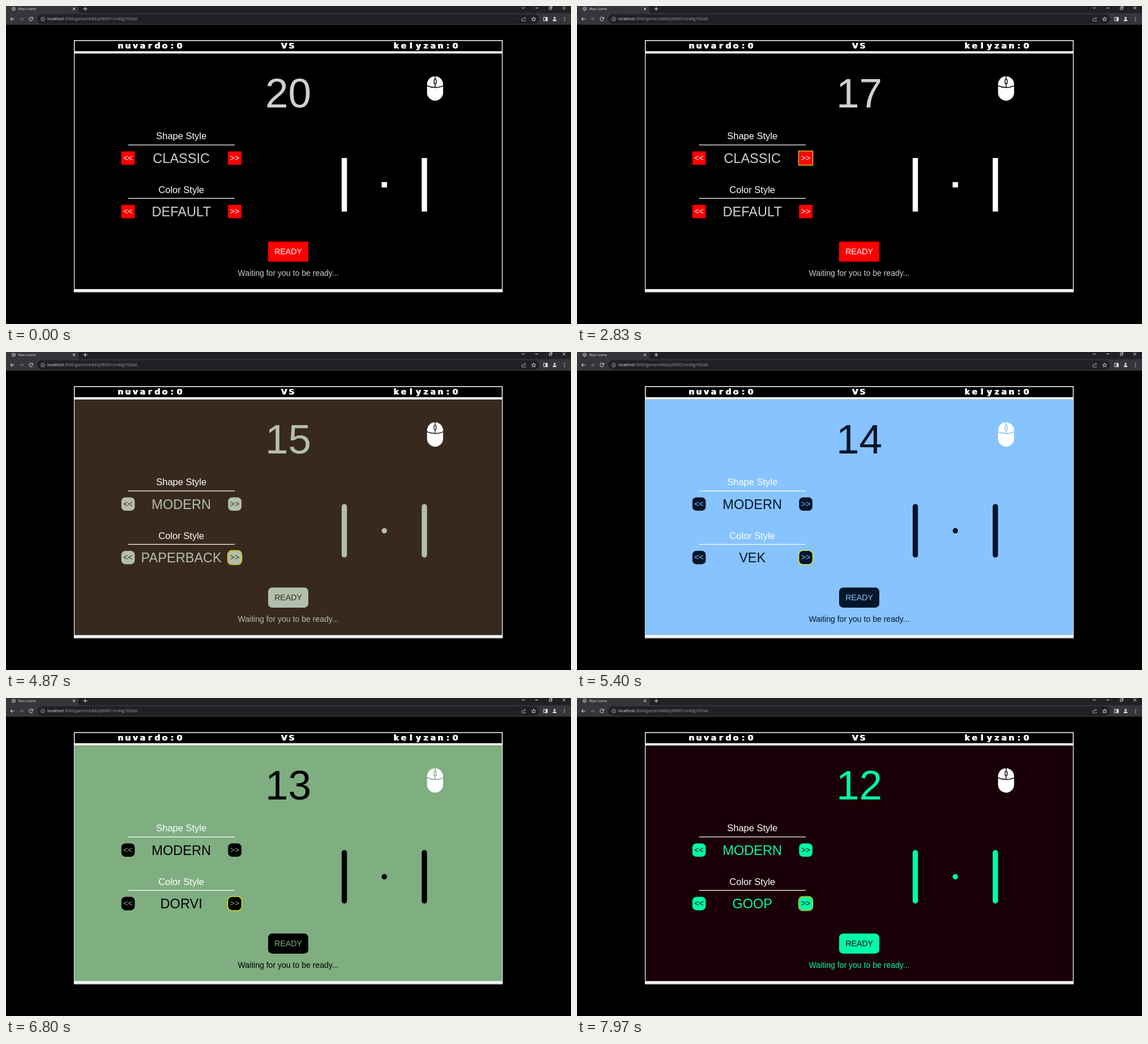
Animation of 998x561 px, one loop 8000 ms. Source, as an HTML page:

```html
<!DOCTYPE html>
<html lang="en">
<head>
<meta charset="utf-8">
<title>Paddle match</title>
<style>
html, body { margin: 0; width: 100%; height: 100%; overflow: hidden; background: #000; }
svg { display: block; width: 100vw; height: 100vh; }
text { font-family: "Liberation Sans", Arial, sans-serif; }
.mid text, text.mid { text-anchor: middle; }
.chrome text { font-family: "Open Sans", sans-serif; }
.icon { fill: none; stroke: #e8eaed; stroke-width: 1; }
.pixel text { font: bold 14px "DejaVu Sans", sans-serif; fill: #fff; text-anchor: middle; text-shadow: 1px 0 #fff; }
.ink { fill: var(--ink); }
.key { fill: var(--key); }
.key-text { fill: var(--keyText); }
.piece { fill: var(--piece); }
.gap { fill: none; stroke: var(--bg); stroke-width: 1.5; }
#ring { fill: none; stroke: var(--ring); stroke-width: 1.4; }
</style>
</head>
<body>
<svg id="stage" viewBox="0 0 998 561">
  <rect width="998" height="561"/>

  <g class="chrome">
    <rect width="998" height="33" fill="#202124"/>
    <path d="M0 33V0H126Q128 0 128 4V10Q128 12.500 131 12.500H998V33Z" fill="#35363a"/>
    <rect x="55" y="14.500" width="887" height="17" rx="8.500" fill="#202124"/>
    <g class="icon">
      <circle cx="13.500" cy="5" r="3" stroke="#b9bbbf"/>
      <path d="M11 4l3 1-1 3M14 2l2 3" stroke="#b9bbbf"/>
      <path d="M117.800 2.800l4.400 4.400m0-4.400l-4.400 4.400M136.500 5h7M140 1.500v7"/>
      <path d="M911 2l2.700 2.700L916.400 2M935 3.500h5M983 1l5 5m0-5l-5 5"/>
      <rect x="959.500" y="2" width="4" height="4" rx=".6"/>
      <path d="M961 .8h3.700v3.700" stroke-width=".7"/>
      <path d="M14.500 23H8m3-3l-3 3 3 3"/>
      <path d="M24 23h6.500m-3-3l3 3-3 3" stroke="#7d7f84"/>
      <path d="M46.700 21.300A3.200 3.200 0 1 0 47 24M47.300 19.500v2.600h-2.800"/>
      <circle cx="65" cy="23" r="3.300" stroke="#b9bbbf" stroke-width=".8"/>
      <path d="M65 22.500v2.300M65 20.800v.9" stroke="#b9bbbf"/>
      <path d="M913 22h-1.500v4.500h6V25M913.500 24q.5-3 4-3m-1.800-2l2 2-2 2" stroke="#b9bbbf" stroke-width=".8"/>
      <path d="M932 19.500l1.100 2.400 2.600.2-2 1.700.6 2.500-2.300-1.300-2.300 1.300.6-2.500-2-1.700 2.600-.2z" stroke-width=".9"/>
      <rect x="949.800" y="20" width="6.400" height="6"/>
    </g>
    <g fill="#e8eaed">
      <rect x="953" y="20" width="3.200" height="6"/>
      <circle cx="969" cy="21" r="1.800"/>
      <path d="M965.700 26.500q0-3 3.300-3t3.300 3z"/>
      <circle cx="986.500" cy="20.300" r=".8"/><circle cx="986.500" cy="23" r=".8"/><circle cx="986.500" cy="25.700" r=".8"/>
      <text x="22" y="7.200" font-size="6">Bipo Game</text>
      <text x="73" y="25.400" font-size="6.930">localhost<tspan fill="#9aa0a6">:3000/game/clk8d2yf60001nn40g1fit2a6</tspan></text>
    </g>
  </g>

  <rect x="120.700" y="61" width="755.800" height="443.300" fill="none" stroke="#fff" stroke-width="1.500"/>
  <rect x="121.400" y="84" width="754.400" height="416" fill="var(--bg)"/>
  <path d="M121 81.700H876M121 501.500H876" stroke="#fff" stroke-width="4"/>
  <g class="pixel" id="header"></g>

  <g class="mid">
    <text class="ink" id="count" x="498.500" y="179.300" font-size="73"></text>
    <g fill="#fff" font-size="16.500">
      <text x="309.700" y="235.200">Shape Style</text>
      <text x="309.700" y="329.600">Color Style</text>
      <path d="M215.500 245.200H404M215.500 339.400H404" stroke="#fff" stroke-width="1.300"/>
    </g>
    <g class="ink" font-size="23.550">
      <text id="shape" x="309.700" y="276.700"></text>
      <text id="color" x="309.700" y="370.900"></text>
    </g>
    <g id="arrows" font-size="14.130"></g>
    <rect id="ring" x="391.500" width="25" height="25"/>
    <rect class="key round" x="463" y="415.600" width="71" height="35.300"/>
    <text class="key-text" x="498.500" y="438.200" font-size="14.130">READY</text>
    <text class="ink" x="498.500" y="475.500" font-size="14.050">Waiting for you to be ready...</text>
  </g>

  <g class="piece">
    <rect class="round" x="592.900" y="268.200" width="9.400" height="94.400"/>
    <rect class="round" x="734.300" y="268.200" width="9.400" height="94.400"/>
    <rect class="round" x="663.500" y="310.600" width="9.500" height="9.500"/>
  </g>

  <rect x="743.700" y="124" width="28.400" height="43" rx="14.200" fill="#fff"/>
  <path class="gap" d="M743 140.500Q758 147 773 140.500M758 123.500v6M758 137v6.500"/>
  <rect class="gap" x="756.200" y="129.300" width="3.600" height="7.800" rx="1.800"/>
</svg>
<script>
const LOOP = 8000;
const FIRST_TICK = 240;
const THEMES = {
  DEFAULT:   { bg: '#000', ink: '#d0d0d0', key: '#f00', keyText: '#fff', piece: '#fff', ring: '#ffc823' },
  PAPERBACK: flat('#38291e', '#b2bfae'),
  VEK:       flat('#87c3ff', '#02162a'),
  DORVI:     flat('#7fae81', '#000'),
  GOOP:      flat('#1a0108', '#00fba8')
};
// Each click: time, chosen shape, chosen color, row that holds focus
const CLICKS = [
  [0, 'CLASSIC', 'DEFAULT', null],
  [1950, 'MODERN', 'DEFAULT', 0],
  [2600, 'CLASSIC', 'DEFAULT', 0],
  [3350, 'MODERN', 'DEFAULT', 0],
  [4500, 'MODERN', 'PAPERBACK', 1],
  [5200, 'MODERN', 'VEK', 1],
  [6150, 'MODERN', 'DORVI', 1],
  [7150, 'MODERN', 'GOOP', 1]
];
const ROWS = [268.3, 362.6];
const $ = id => document.getElementById(id);

function flat(bg, ink) {
  return { bg, ink, key: ink, keyText: bg, piece: ink, ring: '#e9e600' };
}

function add(parent, tag, attrs, text = '') {
  const el = document.createElementNS('http://www.w3.org/2000/svg', tag);
  for (const name in attrs) el.setAttribute(name, attrs[name]);
  el.textContent = text;
  parent.append(el);
}

function addCells(word, left) {
  [...word].forEach((char, i) =>
    add($('header'), 'text', { x: left + 13 * i + 6, y: 75.3 }, char));
}

addCells('nuvardo:0', 196);
addCells('VS', 485);
addCells('kelyzan:0', 683);

for (const y of ROWS) {
  for (const [x, label] of [[215.6, '<<'], [404.1, '>>']]) {
    add($('arrows'), 'rect', { class: 'key round', x: x - 11.8, y: y - 11.8, width: 23.6, height: 23.6 });
    add($('arrows'), 'text', { class: 'key-text', x, y: y + 4.6 }, label);
  }
}
const rounded = document.querySelectorAll('.round');

function applyClick([, shape, color, row]) {
  for (const [name, value] of Object.entries(THEMES[color])) {
    $('stage').style.setProperty('--' + name, value);
  }
  $('shape').textContent = shape;
  $('color').textContent = color;
  const modern = shape === 'MODERN';
  rounded.forEach(el => el.setAttribute('rx', modern ? Math.min(7, el.getAttribute('width') / 2) : 0));
  $('ring').setAttribute('rx', modern ? 7.5 : 0);
  $('ring').setAttribute('visibility', row === null ? 'hidden' : 'visible');
  $('ring').setAttribute('y', ROWS[row ?? 0] - 12.5);
}

let current;
const start = performance.now();

function draw() {
  const t = (performance.now() - start) % LOOP;
  $('count').textContent = 20 - Math.max(0, Math.floor((t - FIRST_TICK) / 1000) + 1);
  const click = CLICKS.findLast(([time]) => time <= t);
  if (click !== current) applyClick(current = click);
  requestAnimationFrame(draw);
}
draw();
</script>
</body>
</html>
```
